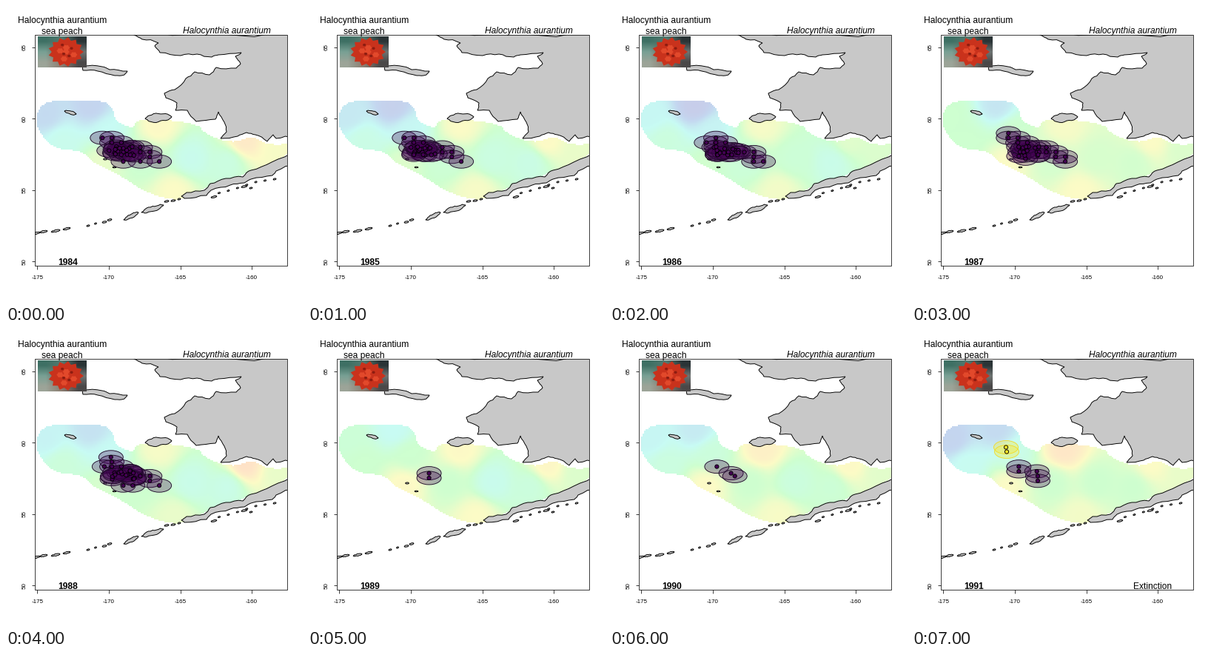
Animation of 400x400 px, one loop 8000 ms. Source, as a matplotlib script:

```python
import numpy as np
import matplotlib.pyplot as plt
from matplotlib.animation import FuncAnimation
from matplotlib.collections import EllipseCollection
from matplotlib.colors import LinearSegmentedColormap, to_rgb
from matplotlib.patches import Polygon, Rectangle
from matplotlib.path import Path

plt.rcParams["font.family"] = "Liberation Sans"
PX = 0.72  # points per pixel at 100 dpi
LEFT, TOP, RIGHT, BOTTOM = 39, 39, 380, 351

fig = plt.figure(figsize=(4, 4), dpi=100, facecolor="white")
ax = fig.add_axes([0, 0, 1, 1])
ax.axis("off")
rng = np.random.default_rng(4)


def label(x, y, text, size=12, va="baseline", **kw):
    return ax.text(x, y, text, fontsize=size * PX, ha="center", va=va,
                   zorder=9, **kw)


def line(x, y):
    ax.plot(x, y, color="black", lw=0.75 * PX, zorder=8, solid_capstyle="butt")


def rounded(points):
    """Cut the corners of a closed outline twice."""
    pts = np.array(points, float)
    for _ in range(2):
        nxt = np.roll(pts, -1, axis=0)
        pts = np.stack([pts * .75 + nxt * .25, pts * .25 + nxt * .75], 1)
        pts = pts.reshape(-1, 2)
    return pts


# --- sea temperature -------------------------------------------------------
SURVEY = [(38, 160), (46, 134), (66, 127), (130, 127), (145, 138), (147, 155),
          (173, 167), (177, 151), (258, 158), (268, 172), (304, 186),
          (335, 175), (352, 188), (392, 186), (384, 200), (320, 229),
          (268, 245), (238, 265), (190, 253), (150, 226), (116, 211),
          (103, 195), (64, 194)]
SITES = np.array([(55, 148), (115, 135), (75, 182), (138, 170), (130, 209),
                  (205, 163), (190, 205), (228, 250), (250, 206), (322, 183),
                  (300, 210), (366, 194)])

# 0 coldest (lilac) ... 5 warmest (orange), one value per site
WARMTH = {
    1984: np.array([1.1, .9, 2.2, 2, 3.6, 4.1, 2.9, 4, 2.2, 4.7, 2.5, 3.9]),
    1986: np.array([1.9, .5, 2.6, 1.8, 3.1, 3.9, 2.7, 3.8, 2.8, 3.4, 2.3, 3.3]),
    1987: np.array([3, 1.4, 3, 3, 4, 3.9, 3.1, 4, 3.2, 4, 3.1, 3.3]),
    1988: np.array([1.8, 1.3, 2.7, 2, 3.2, 3.9, 3, 3.6, 2.3, 5, 2.3, 3.6]),
    1989: np.array([2.8, 2, 3, 3, 4.1, 4.1, 3, 4, 2.2, 4.2, 2.6, 3.3]),
    1991: np.array([.9, 1.1, 2.1, 2.3, 4, 4.8, 3, 3.8, 3, 4, 3, 3.6]),
}
for gap in (1985, 1990):
    WARMTH[gap] = (WARMTH[gap - 1] + WARMTH[gap + 1]) / 2

pale = LinearSegmentedColormap.from_list("pale", [
    "#cbc4e4", "#c4d7f0", "#c8fbf4", "#ceffd0", "#fcfbc6", "#ffe2c8"])
pale.set_bad((1, 1, 1, 0))

gx, gy = np.meshgrid(np.arange(41, 380, 2), np.arange(121, 270, 2))
cells = np.column_stack([gx.ravel(), gy.ravel()])
outside = ~Path(rounded(SURVEY)).contains_points(cells).reshape(gx.shape)
dist2 = ((cells[:, None] - SITES[None]) ** 2).sum(axis=2)
weight = (dist2 + 120.0) ** -1.8
weight /= weight.sum(axis=1, keepdims=True)


def sea(year):
    return np.ma.array((weight @ WARMTH[year]).reshape(gx.shape), mask=outside)


field = ax.imshow(sea(1984), extent=(40, 380, 270, 120), cmap=pale, vmin=0,
                  vmax=5, interpolation="nearest", aspect="auto", zorder=1)

# --- land ------------------------------------------------------------------
frame = Rectangle((LEFT, TOP), RIGHT - LEFT, BOTTOM - TOP,
                  transform=ax.transData)


def land(points, rough=0.12):
    """Closed coast whose edges are broken up by random midpoints."""
    pts = np.array(points, float)
    for _ in range(2):
        step = np.roll(pts, -1, axis=0) - pts
        side = step[:, ::-1] * [1, -1] * rng.uniform(-rough, rough, (len(pts), 1))
        pts = np.stack([pts, pts + step / 2 + side], 1).reshape(-1, 2)
    patch = Polygon(pts, fc="#c8c8c8", ec="black", lw=0.95 * PX, zorder=3)
    ax.add_patch(patch)
    patch.set_clip_path(frame)


def islet(x, y, w, h, tilt=0.2):
    a = np.arange(8) * np.pi / 4
    land(np.column_stack([x + w * np.cos(a),
                          y + h * np.sin(a) - tilt * w * np.cos(a)]))


# mainland
land([(170, 30), (173, 39), (184, 45), (206, 50), (201, 54), (208, 63),
      (236, 67), (258, 65), (278, 69), (287, 66), (318, 63), (310, 68),
      (317, 78), (311, 84), (284, 83), (275, 93), (255, 89), (243, 98),
      (228, 113), (214, 118), (216, 124), (231, 131), (229, 141), (245, 141),
      (257, 156), (283, 153), (287, 143), (295, 157), (298, 170), (290, 179),
      (313, 176), (325, 171), (337, 174), (353, 183), (361, 174), (365, 179),
      (390, 177), (390, 30)], 0.09)
# peninsula
land([(392, 193), (359, 211), (331, 222), (320, 231), (297, 233), (276, 240),
      (268, 249), (244, 252), (237, 257), (241, 260), (271, 256), (277, 249),
      (303, 242), (322, 239), (331, 234), (360, 229), (365, 223), (392, 214)],
     0.09)
# northern island
land([(103, 80), (130, 82), (140, 86), (164, 88), (160, 93), (147, 94),
      (124, 88), (104, 87)], 0.06)

islet(206, 151, 18, 5.5, .07)
islet(87, 144, 8, 2.2, -.25)
islet(198, 274, 15, 3.5, .33)
islet(169, 284, 10, 2.6, .5)
islet(134, 207, 2.4, 1, 0)
islet(146.5, 218, 2.4, .8, 0)
for x, y, w in [(217, 264, 3), (226, 263, 3), (234, 261, 2), (140, 289, 3),
                (133, 292, 3), (121, 294, 1.5), (111, 297, 2), (82, 301, 5),
                (67, 304, 6), (51, 305, 5), (41, 307, 5), (281, 258, 4),
                (322, 244, 4), (331, 246, 2), (363, 234, 2)]:
    islet(x, y, w, .8 + .12 * w)
for x in np.linspace(288, 350, 6):
    islet(x, 252 - .27 * (x - 288) + rng.uniform(-1, 1), 1.6, 1)

# --- frame, axes, titles ---------------------------------------------------
line([LEFT, RIGHT, RIGHT, LEFT, LEFT], [TOP, TOP, BOTTOM, BOTTOM, TOP])
for k in range(4):
    x, y = 42.3 + 96.6 * k, 56 + 96.4 * k
    line([x, x], [BOTTOM, BOTTOM + 4.5])
    line([LEFT, LEFT - 4.5], [y, y])
    label(x, 369, str(-175 + 5 * k), 8)
    label(25.5, y, str(65 - 5 * k), 8, rotation=90, va="center")

label(76, 23, "Halocynthia aurantium")
label(76, 38, "sea peach")
label(298, 37, "Halocynthia aurantium", style="italic")
year_text = label(83.5, 350, "", weight="bold")
event_text = label(325, 350, "")

# --- thumbnail -------------------------------------------------------------
tones = [["#3e7064", "#547a70", "#2a3436"], ["#78a094", "#6a5a50", "#6e7472"],
         ["#9ca498", "#8a7c70", "#4a4848"]]
ax.imshow([[to_rgb(c) for c in row] for row in tones],
          extent=(43, 109, 83, 41), interpolation="bilinear",
          aspect="auto", zorder=5)


def bloom(x, y, r, spikes, color):
    a = np.linspace(0, 2 * np.pi, spikes * 2, endpoint=False)
    d = np.where(np.arange(spikes * 2) % 2, 0.8, 1.0) * r
    ax.add_patch(Polygon(np.column_stack([x + 1.2 * d * np.cos(a),
                                          y + d * np.sin(a)]),
                         fc=color, lw=0, zorder=6))


bloom(81, 62, 20, 13, "#c9321c")
for k in range(9):
    a = 2.4 * k
    bloom(81 + 4 * k ** .5 * np.cos(a), 62 + 4 * k ** .5 * np.sin(a),
          4 - 2 * (k % 2), 6, ["#e2492b", "#8c1c10"][k % 2])

# --- sightings -------------------------------------------------------------
# (column, row) on the survey grid
SHARED = [(1, 1), (1, 2), (2, 2), (4, 4), (5, 4), (5, 5), (6, 6)]
SEEN = {
    1984: [(0, 1), (.7, 3.7), (4, 3), (2.2, 6), (4, 6)],
    1985: [(0, 1), (.7, 3), (4, 3)],
    1986: [(0, 2), (.8, 3), (5, 6)],
    1987: [(0, 0), (0, 1), (4, 3), (6, 5), (1.8, 5.4)],
    1988: [(.9, 0), (.2, 2), (2.2, 6), (3.2, 6)],
    1989: [(2.6, 3.4), (2.6, 4.4)],
    1990: [(1.1, 2), (2.6, 3.4), (3, 4)],
    1991: [(1.1, 2), (1.1, 3), (3, 3), (3.1, 4), (3.1, 5)],
}
LOST = {1991: [(127, 158.5), (128, 164.5)]}


def sightings(year):
    crowded = year < 1989
    grid = SEEN[year] + (SHARED if crowded else [])
    pts = [(130.3 + 12.8 * c, 171.8 + 6.4 * r) for c, r in grid]
    if crowded:
        core = np.random.default_rng(year).uniform((143, 190), (174, 203), (18, 2))
        pts += [tuple(p) for p in core]
    return pts


rings = EllipseCollection([33], [18], [0], units="xy", offsets=[(0, 0)],
                          offset_transform=ax.transData,
                          linewidths=0.9 * PX, zorder=6)
ax.add_collection(rings)
dots = ax.scatter([], [], s=(5.2 * PX) ** 2, edgecolors="black",
                  linewidths=0.9 * PX, zorder=7)

ax.set_xlim(0, 400)
ax.set_ylim(400, 0)


def draw(i):
    year = 1984 + i
    alive, lost = sightings(year), LOST.get(year, [])
    n, m = len(alive), len(lost)
    field.set_data(sea(year))
    rings.set_offsets(alive + lost)
    rings.set_facecolor([to_rgb("#440154") + (.3,)] * n
                        + [to_rgb("#fde725") + (.3,)] * m)
    rings.set_edgecolor(["#1f0a2a"] * n + ["#f2dc2a"] * m)
    dots.set_offsets(alive + lost)
    dots.set_facecolor(["#440154"] * n + ["#fde725"] * m)
    year_text.set_text(str(year))
    event_text.set_text("Extinction" if lost else "")
    return field, rings, dots, year_text, event_text


anim = FuncAnimation(fig, draw, frames=8, interval=1000, repeat=True,
                     repeat_delay=0, init_func=lambda: draw(0))
plt.show()
```
